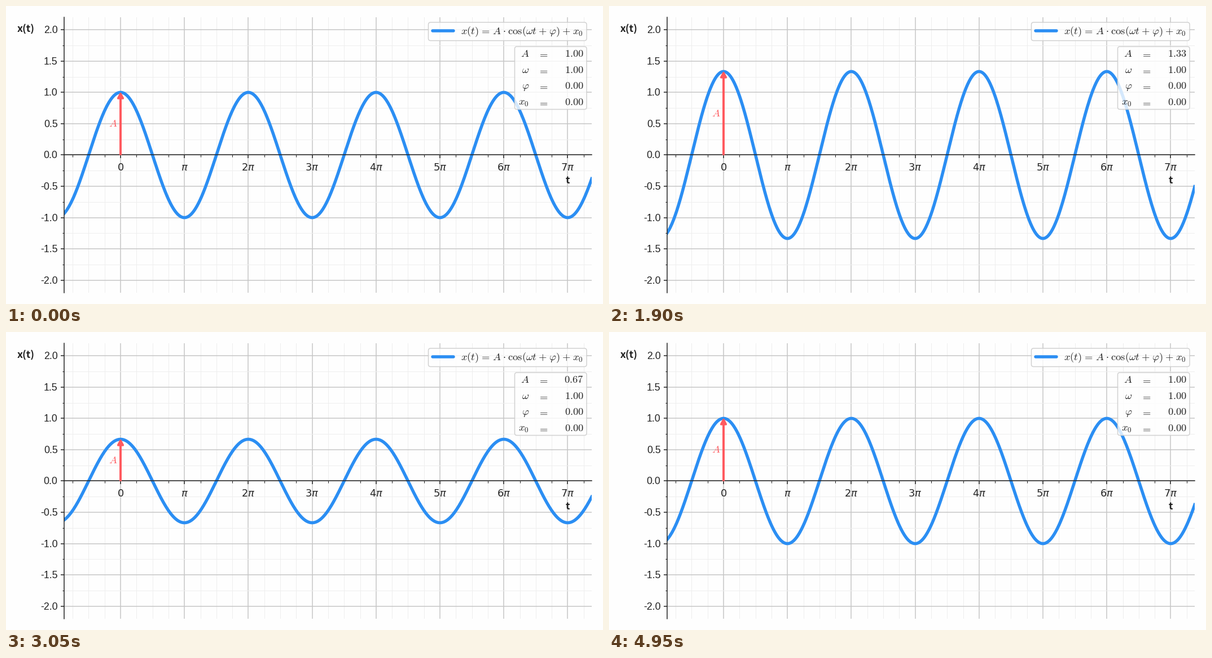
A matplotlib script for the animation above (5 s loop, 1058 by 529 pixels).

```python
import numpy as np
import matplotlib.pyplot as plt
from matplotlib.animation import FuncAnimation
from matplotlib.patches import FancyBboxPatch, Polygon

W, H, DPI = 1058, 529, 64
LEFT, RIGHT, TOP, BOTTOM = 103, 1038, 20, 509
X0, PX_PER_PI = 203, 113.2
Y0, PX_PER_UNIT = 264.5, (BOTTOM - TOP) / 4.4
FRAMES, INTERVAL = 100, 50

BG, INK, BLUE, RED = "#fefefe", "#222222", "#2b8ef3", "#ff5a5f"
PLAIN = ["Liberation Sans", "DejaVu Sans"]
BOLD = ["Noto Sans CJK JP", "DejaVu Sans"]


def pt(px):
    return px * 72 / DPI


def amplitude(i):
    return 1 + 0.5 * np.sin(2 * np.pi * i / (FRAMES - 1))


fig = plt.figure(figsize=(W / DPI, H / DPI), dpi=DPI, facecolor=BG)

# Plot area
ax = fig.add_axes([LEFT / W, 1 - BOTTOM / H, (RIGHT - LEFT) / W, (BOTTOM - TOP) / H],
                  facecolor=BG)
t_min = (LEFT - X0) / PX_PER_PI * np.pi
t_max = (RIGHT - X0) / PX_PER_PI * np.pi
ax.set_xlim(t_min, t_max)
ax.set_ylim(-2.2, 2.2)

x_minor = np.arange(-3, 30)
y_minor = np.arange(-8, 9)
ax.set_xticks(np.arange(8) * np.pi)
ax.set_xticks(x_minor[x_minor % 4 != 0] * np.pi / 4, minor=True)
ax.set_yticks(np.arange(-4, 5) / 2)
ax.set_yticks(y_minor[y_minor % 2 != 0] / 4, minor=True)
ax.tick_params(which="major", length=pt(6), width=pt(1.5), color=INK,
               labelbottom=False, labelleft=False)
ax.tick_params(which="minor", length=pt(3.5), width=pt(1.1), color=INK)
ax.grid(which="major", color="#c6c6c6", lw=pt(1.5))
ax.grid(which="minor", color="#eeeeee", lw=pt(1))

ax.spines[["top", "right"]].set_visible(False)
ax.spines["bottom"].set_position("zero")
for side in ("left", "bottom"):
    ax.spines[side].set(color=INK, linewidth=pt(1.5))

t = np.linspace(t_min, t_max, 1000)
curve, = ax.plot(t, np.cos(t), color=BLUE, lw=pt(5.5))

# Overlay in pixel coordinates, y pointing down
top = fig.add_axes([0, 0, 1, 1], zorder=2)
top.set(xlim=(0, W), ylim=(H, 0))
top.axis("off")


def label(x, y, s, size=17.7, ha="center", color=INK, **kw):
    return top.text(x, y, s, fontsize=pt(size), ha=ha, va="baseline",
                    color=color, **kw)


def math(x, y, s, ha="right", color=INK):
    return label(x, y, f"${s}$", 18.5, ha, color, math_fontfamily="cm", zorder=5)


def box(x0, y0, x1, y1):
    top.add_patch(FancyBboxPatch(
        (x0, y0), x1 - x0, y1 - y0, boxstyle="round,pad=0,rounding_size=4",
        fc=(1, 1, 1, 0.8), ec=(0.8, 0.8, 0.8, 0.9), lw=pt(1.5), zorder=4))


for v in np.arange(-4, 5) / 2:
    label(91.5, Y0 - v * PX_PER_UNIT + 6, f"{v:.1f}", ha="right", family=PLAIN)
for n in range(8):
    name = "0" if n == 0 else r"\pi" if n == 1 else rf"{n}\pi"
    label(X0 + n * PX_PER_PI, 291.5, f"${name}$", math_fontfamily="dejavusans")
label(19.5, 46.5, "x(t)", ha="left", family=BOLD, weight="bold")
label(995.5, 315, "t", family=BOLD, weight="bold")

# Legend
box(748.5, 29, 1029, 61.5)
top.plot([755.5, 792.5], [44, 44], color=BLUE, lw=pt(5.5),
         solid_capstyle="round", zorder=5)
rel, gap = r"\hspace{0.116}", r"\hspace{0.053}"
plus = gap + "+" + gap
math(806, 50.5, rf"x(t){rel}={rel}A{gap}\cdot{gap}\cos(\omega t{plus}\varphi){plus}x_0",
     ha="left")

# Parameter table
box(901.5, 72, 1029, 183.5)
values = []
rows = [("A", 1), (r"\omega", 1), (r"\varphi", 0), ("x_0", 0)]
for k, (symbol, value) in enumerate(rows):
    y = 90.3 + 28.5 * k
    math(927, y, symbol)
    math(951, y, "=", ha="center")
    values.append(math(1023.7, y, f"{value:.2f}"))

# Amplitude arrow
shaft, = top.plot([X0, X0], [Y0, Y0], color=RED, lw=pt(4),
                  solid_capstyle="butt", zorder=3)
head = top.add_patch(Polygon([(0, 0)] * 3, fc=RED, ec=RED, lw=pt(3.5),
                             joinstyle="round", zorder=3))
tag = math(197.5, Y0, "A", color=RED)


def update(i):
    a = amplitude(i)
    tip = Y0 - a * PX_PER_UNIT
    curve.set_ydata(a * np.cos(t))
    shaft.set_ydata([Y0 + 0.5, tip + 8])
    head.set_xy([(X0, tip + 2.2), (X0 - 4.4, tip + 10.5), (X0 + 4.4, tip + 10.5)])
    tag.set_y((Y0 + tip) / 2 + 5.5)
    values[0].set_text(f"${a:.2f}$")
    return curve, shaft, head, tag, values[0]


anim = FuncAnimation(fig, update, frames=FRAMES, interval=INTERVAL,
                     repeat=True, repeat_delay=0, blit=False)
plt.show()
```
